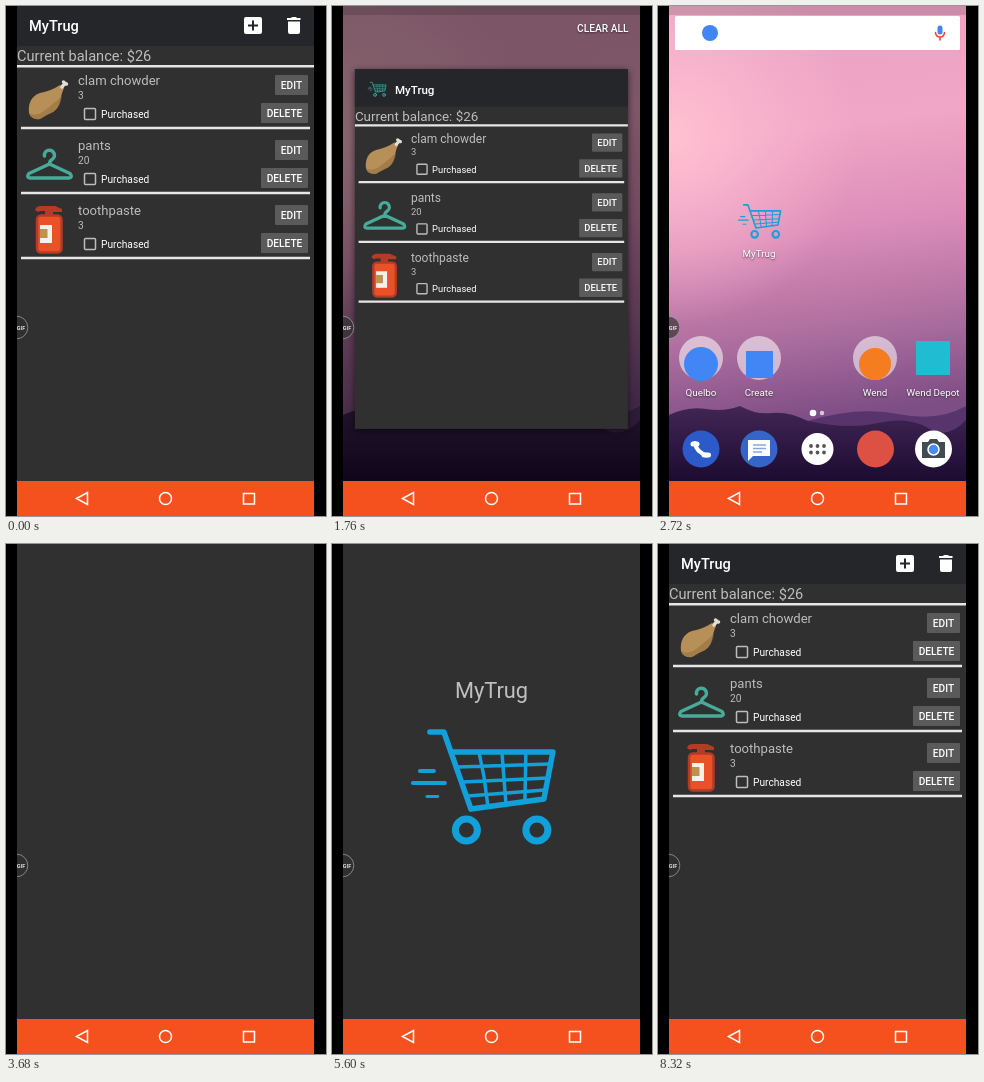
An HTML page that plays this animation: 320x510 px, repeating every 9.12 s.

```html
<!DOCTYPE html>
<html lang="en">
<head>
<meta charset="utf-8">
<title>MyTrug</title>
<style>
html, body { margin: 0; width: 100%; height: 100%; overflow: hidden; background: #000; }
svg { display: block; width: 100%; height: 100%; font-family: Roboto, sans-serif; }
.m { font-weight: 500; fill: #fff; }
.mid { text-anchor: middle; }
.soft { fill: #bdbdbd; }
.label { font-size: 9.8px; fill: #fff; text-anchor: middle; text-shadow: 0 1px 2px #0009; }
.line { fill: none; stroke-linecap: round; stroke-linejoin: round; }
#card { filter: drop-shadow(0 2px 4px #0009); }
</style>
</head>
<body>
<svg viewBox="0 0 320 510">
  <defs>
    <linearGradient id="sky" gradientUnits="userSpaceOnUse" x1="130" y1="0" x2="185" y2="410">
      <stop offset="0" stop-color="#eba3c3"/>
      <stop offset=".3" stop-color="#f0a6c6"/>
      <stop offset=".55" stop-color="#dc8db9"/>
      <stop offset=".8" stop-color="#ab6d9e"/>
      <stop offset="1" stop-color="#7d4d85"/>
    </linearGradient>
    <radialGradient id="glow" gradientUnits="userSpaceOnUse" cx="11" cy="130" r="190">
      <stop offset="0" stop-color="#ffc2d2"/>
      <stop offset="1" stop-color="#ffb8d0" stop-opacity="0"/>
    </radialGradient>
    <linearGradient id="hill" x2="0" y2="1">
      <stop offset="0" stop-color="#422656"/>
      <stop offset="1" stop-color="#1c0b30"/>
    </linearGradient>
    <clipPath id="screen"><path d="M11 0H308V475H11z"/></clipPath>
    <g id="trolley" class="line">
      <path stroke-width="5.5" d="M98 188H112L139 265L212 255L221 208H119"/>
      <path stroke-width="3.5" d="M147 208L152 232L156 262M170 208L174 259M194 208L193 257M126 223L218 220M131 238L216 234M136 252L213 246"/>
      <path stroke-width="4" d="M88 227H102M81 239H113"/>
      <path stroke-width="2.8" d="M95 252.5H106"/>
      <circle cx="134.5" cy="286" r="11" stroke-width="7"/>
      <circle cx="205" cy="286" r="11" stroke-width="7"/>
    </g>
  </defs>

  <g clip-path="url(#screen)">
    <g id="wall">
      <path fill="url(#sky)" d="M11 0H308V475H11z"/>
      <path fill="url(#glow)" d="M11 0H308V475H11z"/>
      <path fill="#000" opacity=".14" d="M11 0H308V9H11z"/>
      <path fill="#57346b" d="M150 415Q200 400 240 408T308 400V475H150z"/>
      <path fill="url(#hill)" d="M11 409Q30 400 48 403T82 400Q98 409 114 407T150 415Q190 424 220 417T270 422T308 414V475H11z"/>
      <path id="dim" d="M11 0H308V475H11z"/>
    </g>

    <g id="home">
      <rect x="17" y="10" width="285" height="34" rx="1.5" fill="#fff"/>
      <circle cx="52" cy="27" r="8" fill="#4285f4"/>
      <rect x="279.500" y="19.500" width="5" height="9" rx="2.500" fill="#4285f4"/>
      <path class="line" stroke="#ea4335" stroke-width="1.6" d="M277.500 26.500Q278 31 282 31T286.500 26.500M282 31V34"/>
      <use href="#trolley" stroke="#1a9fdb" transform="translate(56.3 142.5) scale(.3)"/>
      <g fill="#fff" fill-opacity=".55">
        <circle cx="43" cy="352" r="22"/><circle cx="101" cy="352" r="22"/><circle cx="217" cy="352" r="22"/>
      </g>
      <circle cx="43" cy="358" r="17" fill="#4285f4"/>
      <path fill="#4285f4" d="M88 345H115V372H88z"/>
      <circle cx="217" cy="358" r="16" fill="#f57c1f"/>
      <path fill="#1fbcd2" d="M258 335H292V369H258z"/>
      <g id="labels"></g>
      <circle cx="155" cy="407" r="3.300" fill="#fff"/>
      <circle cx="164" cy="407" r="2.200" fill="#fff" opacity=".7"/>
      <circle cx="43" cy="443" r="18.500" fill="#2c5bc9"/>
      <path class="line" stroke="#fff" stroke-width="4" d="M37 437Q38 446 49 449.500"/>
      <path class="line" stroke="#fff" stroke-width="5" stroke-linecap="butt" d="M35 438H39M46 449H50.500"/>
      <circle cx="101" cy="443" r="18.500" fill="#3565c9"/>
      <path fill="#fff" d="M90 434H112V450H95L90 455z"/>
      <path stroke="#8aa5dc" stroke-width="1.500" d="M95 439H108M95 442.500H108M95 446H104"/>
      <circle cx="159.500" cy="443" r="16" fill="#fff"/>
      <path class="line" stroke="#555" stroke-width="3.800" d="M153 440h0M159.500 440h0M166 440h0M153 446.500h0M159.500 446.500h0M166 446.500h0"/>
      <circle cx="217.500" cy="443" r="18.500" fill="#dd5144"/>
      <circle cx="275.500" cy="443" r="18.500" fill="#fff"/>
      <path fill="#424a52" d="M264 436H270L272 433H279L281 436H287V452H264z"/>
      <circle cx="275.500" cy="443.500" r="5.500" fill="#4a8af4" stroke="#fff" stroke-width="1.500"/>
    </g>

    <text id="clear" class="m" x="296.500" y="26" font-size="10.2" text-anchor="end" style="text-shadow:0 1px 2px #0008">CLEAR ALL</text>

    <g id="splash">
      <path fill="#303030" d="M11 0H308V475H11z"/>
      <text id="name" class="mid" x="159.500" y="153.500" font-size="21.8" fill="#bfbfbf">MyTrug</text>
      <use id="cart" href="#trolley" stroke="#11a0da"/>
    </g>

    <g id="card">
      <rect id="page" x="11" width="297" fill="#303030"/>
      <path fill="#25262a" d="M11 -1H308V40H11z"/>
      <g id="bar">
        <text class="m" x="23" y="25" font-size="14.6">MyTrug</text>
        <rect x="238" y="11" width="18" height="17" rx="2" fill="#fff"/>
        <path stroke="#25262a" stroke-width="2" d="M242 19.500H252M247 14.500V24.500"/>
        <path fill="#fff" d="M281 12H285L286 11H290L291 12H294.500V14H281zM282 15.500H294V26Q294 28 292 28H284Q282 28 282 26z"/>
      </g>
      <g id="head">
        <use href="#trolley" stroke="#3db5a8" transform="translate(14.2 -12.7) scale(.139)"/>
        <text class="m" x="54.600" y="26" font-size="12.6">MyTrug</text>
      </g>
      <text class="soft" x="11" y="55" font-size="14.6">Current balance: $26</text>
      <path fill="#e6e6e6" d="M11 59H308V61.500H11z"/>
      <g id="rows"></g>
      <path fill="#b78f58" d="M23 107C22 98 25 90 34 87Q45 85 54 79L58 82C53 92 56 100 47 106Q40 109 34 113Q25 114 23 107z"/>
      <path fill="#96713f" d="M23 107Q30 111 38 105T56 90Q54 102 47 106Q40 109 34 113Q25 114 23 107z" opacity=".6"/>
      <path class="line" stroke="#e4dfd5" stroke-width="3.500" d="M56 81L59 77M57.500 76h0M60.500 78h0"/>
      <path class="line" stroke="#48ab99" stroke-width="3.500" d="M38.500 150A5 5 0 1 1 46 153.500Q43.500 155 43.500 158L23 167.500Q20 171.500 24 172H63Q67 171.500 64 167.500L43.500 158"/>
      <path fill="#b23c25" d="M29 204Q30 200 35 200H49L56 203V206H47V209H39V205H34L32 206z"/>
      <rect x="31" y="209.500" width="24.500" height="37" rx="4" fill="#ea5128" stroke="#b23c25" stroke-width="2.500"/>
      <path fill="#f4f0ea" d="M34 219H46V237H34z"/>
      <path fill="#c09050" d="M34 223H41.500V232H34z"/>
    </g>
  </g>

  <path fill="#f4511e" d="M11 475H308V510H11z"/>
  <path fill="none" stroke="#fff" stroke-width="1.500" d="M70.500 492.500L81.500 486.500V498.500zM237.500 487.500H248.500V498H237.500z"/>
  <circle cx="159.500" cy="492.500" r="6" fill="none" stroke="#fff" stroke-width="1.500"/>
  <g clip-path="url(#screen)">
    <circle cx="10.500" cy="321.500" r="11.300" fill="#303030" fill-opacity=".65" stroke="#aaa" stroke-width=".7"/>
    <text class="m mid" x="15" y="323.500" font-size="5.500">GIF</text>
  </g>
</svg>
<script>
const $ = id => document.getElementById(id);
const show = (id, alpha) => {
  $(id).style.display = alpha ? '' : 'none';
  $(id).style.opacity = +alpha;
};

const button = (x, y, text) =>
  `<rect x="${x}" y="${y}" width="${302 - x}" height="20" rx="1" fill="#5a5a5a"/>
   <text class="m mid" x="${(x + 302) / 2}" y="${y + 13.7}" font-size="10.2">${text}</text>`;

$('rows').innerHTML = [['clam chowder', 3], ['pants', 20], ['toothpaste', 3]].map(([item, price], i) =>
  `<g transform="translate(0 ${i * 65})">
    <text class="soft" x="72" y="79" font-size="13.1">${item}</text>
    <text class="soft" x="72" y="93" font-size="10.2">${price}</text>
    <rect x="78.500" y="102.500" width="11" height="11" rx="1" fill="none" stroke="#bdbdbd" stroke-width="1.500"/>
    <text x="95" y="111.700" font-size="10.2" fill="#fff">Purchased</text>
    ${button(269, 69, 'EDIT')}${button(255, 97, 'DELETE')}
    <path fill="#e6e6e6" d="M15 120.800H304V123.200H15z"/>
  </g>`).join('');

$('labels').innerHTML = [[43, 'Quelbo'], [101, 'Create'], [217, 'Wend'], [275, 'Wend Depot'], [101, 'MyTrug', 251]]
  .map(([x, text, y = 390]) => `<text class="label" x="${x}" y="${y}">${text}</text>`).join('');

const LOOP = 9120, STEP = 160;
const ease = p => 0.5 - Math.cos(Math.PI * Math.min(1, Math.max(0, p))) / 2;

function draw(time) {
  const t = Math.floor(time % LOOP / STEP) * STEP;
  const within = (a, b) => t >= a && t < b;
  const recents = within(1600, 2560);

  // The list shrinks into a card in the overview
  const k = recents ? (t < 1760 ? 0.5 : 1) : 0;
  $('card').setAttribute('transform', `translate(${12.8 * k} ${64 * k}) scale(${1 - 0.081 * k})`);
  $('page').setAttribute('height', 475 - 84.5 * k);
  show('card', within(2560, 6560) ? 0 : t === 6560 ? 0.5 : 1);
  show('bar', !recents);
  show('head', recents);
  show('clear', recents && k);

  show('wall', within(1600, 3680));
  show('dim', recents ? 0.48 : t === 2560 ? 0.24 : 0);
  show('home', within(2560, 3680) && (t < 2720 ? 0.5 : 1));

  // The trolley rolls in from the left behind the title
  show('splash', within(3680, 6720));
  show('name', t >= 3840);
  show('cart', t >= 3840);
  $('cart').setAttribute('x', -212 + 286 * ease((t - 4047) / 2353));
}

const start = performance.now();
function tick() {
  draw(performance.now() - start);
  requestAnimationFrame(tick);
}
tick();
</script>
</body>
</html>
```
